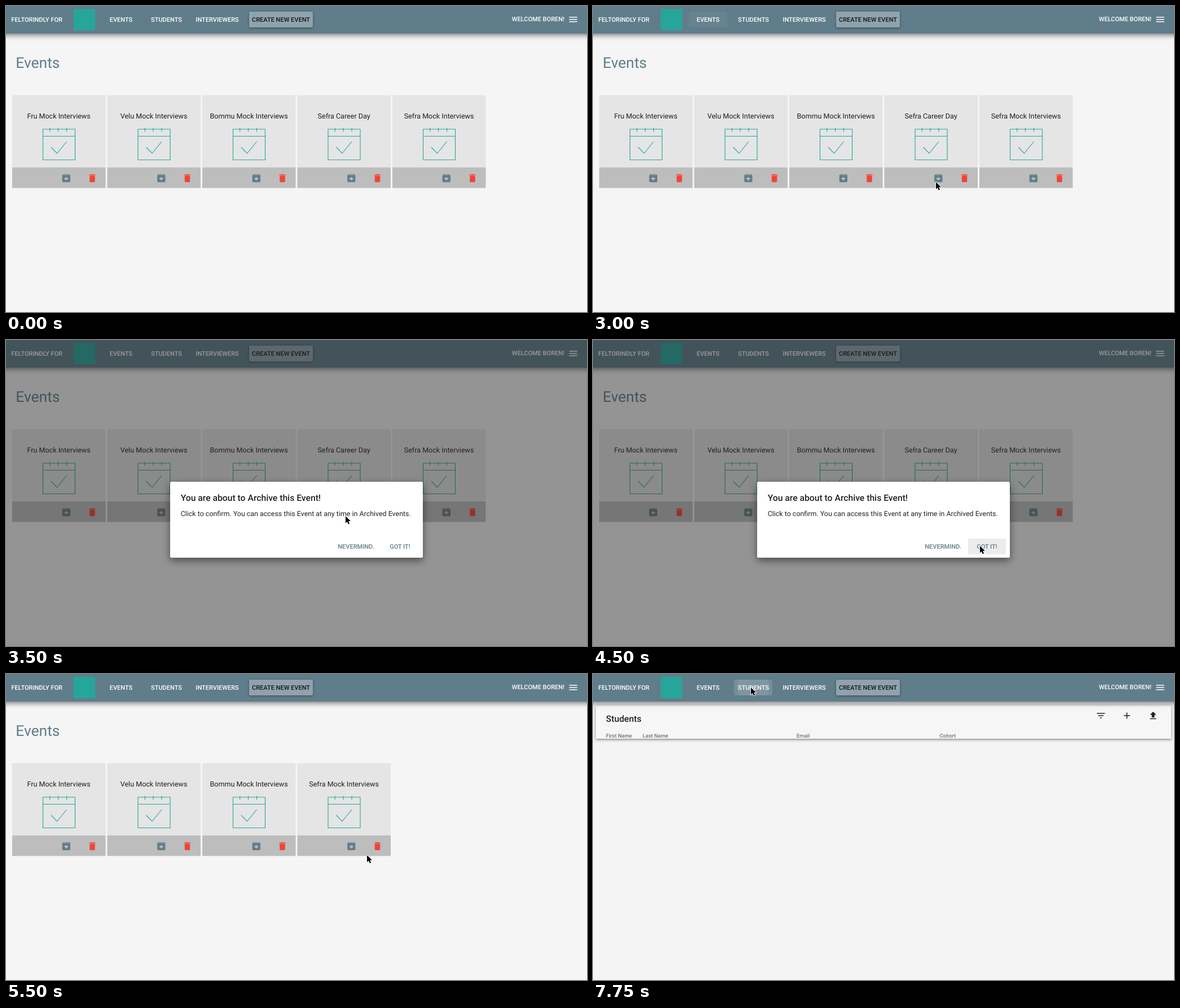
Write an HTML page with a canvas that moves like this. It is 1030x544 px and loops after 8000 ms.

```html
<!DOCTYPE html>
<html lang="en">
<head>
<meta charset="utf-8">
<title>Events</title>
<style>
html, body { margin: 0; width: 100%; height: 100%; overflow: hidden; background: #f5f5f5; }
canvas { display: block; }
</style>
</head>
<body>
<canvas id="stage" width="1030" height="544"></canvas>
<script>
const ctx = document.getElementById('stage').getContext('2d');
const W = 1030, H = 544, LOOP = 8000, STEP = 250;
const SLATE = '#607d8b', TEAL = '#26a69a', INK = 'rgba(0,0,0,.87)';

const ICONS = {
  menu: 'M3 18h18v-2H3v2zm0-5h18v-2H3v2zm0-7v2h18V6H3z',
  archive: 'M20.54 5.23l-1.39-1.68C18.88 3.21 18.47 3 18 3H6c-.47 0-.88.21-1.16.55L3.46 5.23C3.17 5.57 3 6.02 3 6.5V19c0 1.1.9 2 2 2h14c1.1 0 2-.9 2-2V6.5c0-.48-.17-.93-.46-1.27zM12 17.5L6.5 12H10v-2h4v2h3.5L12 17.5zM5.12 5l.81-1h12l.94 1H5.12z',
  trash: 'M6 19c0 1.1.9 2 2 2h8c1.1 0 2-.9 2-2V7H6v12zM19 4h-3.5l-1-1h-5l-1 1H5v2h14V4z',
  filter: 'M10 18h4v-2h-4v2zM3 6v2h18V6H3zm3 7h12v-2H6v2z',
  add: 'M19 13h-6v6h-2v-6H5v-2h6V5h2v6h6v2z',
  upload: 'M9 16h6v-6h4l-7-7-7 7h4zm-4 2h14v2H5z'
};
for (const k in ICONS) ICONS[k] = new Path2D(ICONS[k]);

const POINTER = new Path2D('M0 0V12.6L2.9 9.9L4.9 14.4L7 13.5L5.1 9.1H9Z');

// pointer stops: time, x, y
const PATH = [
  [250, 656, 271], [500, 590, 232], [1000, 270, 62], [1250, 204, 26], [1500, 204, 26],
  [1750, 390, 150], [2000, 627, 298], [2250, 608, 313], [3000, 608, 313],
  [3250, 602, 313], [3500, 602, 313], [4000, 662, 349], [4250, 686, 366],
  [5250, 686, 366], [5500, 640, 322], [6250, 404, 161], [6500, 309, 59],
  [6750, 290, 34], [7000, 280, 24], [8000, 280, 24]
];

function pointerAt(t) {
  if (t < PATH[0][0]) return null;
  const i = PATH.findIndex(p => p[0] > t);
  const [t0, x0, y0] = PATH[i - 1], [t1, x1, y1] = PATH[i];
  const k = (t - t0) / (t1 - t0);
  return [x0 + (x1 - x0) * k, y0 + (y1 - y0) * k];
}

function text(str, x, y, size, color = INK, weight = 400, align = 'left') {
  ctx.font = `${weight} ${size}px Roboto, sans-serif`;
  ctx.textAlign = align;
  ctx.fillStyle = color;
  ctx.fillText(str, x, y);
}

function box(x, y, w, h, color, radius = 0, shadow) {
  ctx.save();
  if (shadow) [ctx.shadowOffsetY, ctx.shadowBlur, ctx.shadowColor] = shadow;
  ctx.fillStyle = color;
  ctx.beginPath();
  ctx.roundRect(x, y, w, h, radius);
  ctx.fill();
  ctx.restore();
}

function icon(name, cx, cy, color, size = 19) {
  ctx.save();
  ctx.translate(cx - size / 2, cy - size / 2);
  ctx.scale(size / 24, size / 24);
  ctx.fillStyle = color;
  ctx.fill(ICONS[name]);
  ctx.restore();
}

function ripple(x, y, w, h, cx, cy, r, color) {
  ctx.save();
  ctx.beginPath();
  ctx.rect(x, y, w, h);
  ctx.clip();
  ctx.beginPath();
  ctx.arc(cx, cy, r, 0, 2 * Math.PI);
  ctx.fillStyle = color;
  ctx.fill();
  ctx.restore();
}

function drawHeader(t) {
  box(-20, -20, W + 40, 69, SLATE, 0, [3, 9, 'rgba(0,0,0,.5)']);
  text('FELTORINDLY FOR', 9.3, 28, 11, '#fff', 500);
  box(120, 5, 38, 38, TEAL);

  if (t >= 1250 && t < 3250) {
    box(170, 10, 68, 28, `rgba(255,255,255,${t < 2250 ? .12 : .045})`, 2);
    if (t === 1500) ripple(170, 10, 68, 28, 204, 24, 24, 'rgba(255,255,255,.1)');
  }
  if (t >= 7000) {
    box(250, 10, 68, 28, 'rgba(255,255,255,.13)', 2);
    if (t >= 7500) ripple(250, 10, 68, 28, 284, 24, t < 7750 ? 15 : 29, 'rgba(255,255,255,.07)');
  }
  text('EVENTS', 204, 28, 11, '#fff', 500, 'center');
  text('STUDENTS', 284.5, 28, 11, '#fff', 500, 'center');
  text('INTERVIEWERS', 374.5, 28, 11, '#fff', 500, 'center');

  box(431, 10, 113, 28, '#8fa3ad', 2, [1, 4, 'rgba(0,0,0,.4)']);
  text('CREATE NEW EVENT', 487.5, 28, 11, INK, 500, 'center');
  text('WELCOME BOREN!', 990, 27, 11, '#fff', 500, 'right');
  icon('menu', 1005.5, 24, '#fff');
}

function drawCard(title, i) {
  ctx.save();
  ctx.translate(11 + 168.5 * i, 0);
  box(0, 158.5, 165.5, 128.5, '#e5e5e5');
  box(0, 287, 165.5, 36.5, '#bdbdbd');
  text(title, 82.6, 200, 12.55, INK, 400, 'center');

  ctx.strokeStyle = TEAL;
  ctx.lineWidth = 1.1;
  ctx.beginPath();
  ctx.rect(54.5, 219, 57, 54.5);
  ctx.moveTo(54.5, 231.5);
  ctx.lineTo(111.5, 231.5);
  for (const x of [66.7, 81.5, 96.5]) {
    ctx.moveTo(x, 216.5);
    ctx.lineTo(x, 223.5);
  }
  ctx.moveTo(69, 251);
  ctx.lineTo(79.5, 262);
  ctx.lineTo(96.5, 241);
  ctx.stroke();

  icon('archive', 95.8, 306, SLATE);
  icon('trash', 142, 306, '#f44336');
  ctx.restore();
}

function drawEvents(t) {
  text('Events', 17.3, 109.5, 26.4, SLATE);
  const names = ['Fru Mock Interviews', 'Velu Mock Interviews', 'Bommu Mock Interviews',
    'Sefra Career Day', 'Sefra Mock Interviews'];
  if (t >= 5250) names.splice(3, 1);
  names.forEach(drawCard);
}

function drawStudents() {
  box(0, 0, W, H, '#f4f4f4');
  box(5, 56, 1020, 59, '#f6f6f6', 1, [1.5, 5, 'rgba(0,0,0,.5)']);
  text('Students', 23, 85, 15.7, INK, 500);
  const heads = { 'First Name': 23, 'Last Name': 88, 'Email': 360.7, 'Cohort': 614.5 };
  for (const h in heads) text(h, heads[h], 113, 9.4, 'rgba(0,0,0,.54)', 500);
  icon('filter', 900.3, 74, INK);
  icon('add', 946.5, 74, INK);
  icon('upload', 993, 74, INK);
}

function drawDialog(t) {
  const opening = t < 3500, closing = t >= 4750;
  if (!closing) box(0, 0, W, H, 'rgba(33,33,33,.46)');
  ctx.save();
  if (opening) {
    ctx.globalAlpha = .84;
    ctx.translate(515, 319.5);
    ctx.scale(.911, .911);
    ctx.translate(-515, -319.5);
  }
  box(291, 252, 448, 135, closing ? '#f6f6f6' : '#fff', 2, [5, 14, 'rgba(0,0,0,.5)']);
  text('You are about to Archive this Event!', 309.7, 285.5, 15.7, INK, 500);
  text('Click to confirm. You can access this Event at any time in Archived Events.', 309.7, 313, 12.45);
  if (t >= 4250) {
    box(665, 353, 67, 28, closing ? '#dfe3e5' : '#ececec', 2);
    if (closing) ripple(665, 353, 67, 28, 689, 366, 17, 'rgba(96,125,139,.12)');
  }
  text('NEVERMIND.', 620.5, 371, 11, SLATE, 500, 'center');
  text('GOT IT!', 698.5, 371, 11, SLATE, 500, 'center');
  ctx.restore();
}

function drawPointer(t) {
  const p = pointerAt(t);
  if (!p) return;
  ctx.save();
  ctx.translate(p[0], p[1]);
  ctx.lineJoin = 'round';
  ctx.lineWidth = 1.8;
  ctx.strokeStyle = '#fff';
  ctx.stroke(POINTER);
  ctx.fillStyle = '#000';
  ctx.fill(POINTER);
  ctx.restore();
}

function frame(now) {
  const t = Math.floor((now % LOOP) / STEP) * STEP;
  ctx.textRendering = 'geometricPrecision';
  box(0, 0, W, H, '#f5f5f5');
  if (t < 7750) drawEvents(t); else drawStudents();
  drawHeader(t);
  if (t >= 3250 && t < 5000) drawDialog(t);
  drawPointer(t);
  requestAnimationFrame(frame);
}
requestAnimationFrame(frame);
</script>
</body>
</html>
```
